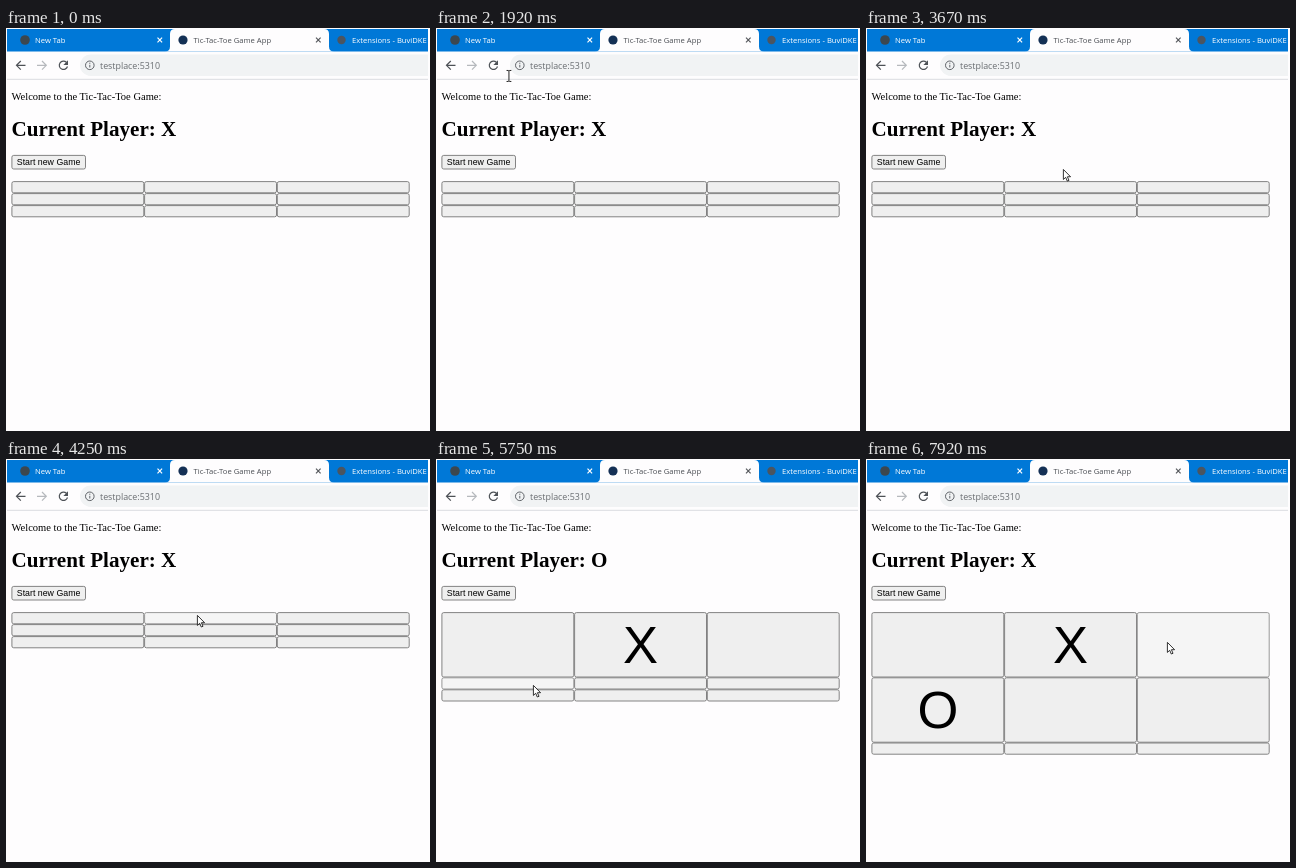
An HTML page for the animation above (8000 ms loop, 424 px wide and 403 px high).

```html
<!DOCTYPE html>
<html lang="en">
<head>
<meta charset="utf-8">
<title>Tic-Tac-Toe</title>
<style>
  html, body { margin: 0; width: 100%; height: 100%; overflow: hidden; background: #fefdfe; }
  svg { display: block; width: 100%; height: 100%; }
  .ui { font: 7.65px "Open Sans", sans-serif; }
  .serif { font: 10.5px "Liberation Serif", serif; }
  .title { font: bold 21.1px "Liberation Serif", serif; }
  .sans { font: 8.8px "Liberation Sans", sans-serif; }
  .mark { font: 52.5px "Liberation Sans", sans-serif; text-anchor: middle; }
  .line { fill: none; stroke-width: 1.2; }
</style>
</head>
<body>
<svg viewBox="0 0 424 403">
  <defs><clipPath id="window"><rect x="1" width="421" height="403"/></clipPath></defs>
  <rect width="424" height="403" fill="#fefdfe"/>

  <g clip-path="url(#window)">
    <rect y="1" width="424" height="22.5" fill="#0078d7"/>
    <path d="M159 23.5q5 0 5-5V6q0-5 5-5h149q5 0 5 5v12.5q0 5 5 5z" fill="#fefdfe"/>
    <circle cx="19" cy="12" r="4.8" fill="#3c474f"/>
    <circle cx="177" cy="12" r="4.6" fill="#143055"/>
    <circle cx="335.5" cy="12" r="4.2" fill="#4b5560"/>
    <g class="ui">
      <text x="29" y="15" fill="#fff">New Tab</text>
      <text x="187.5" y="15" fill="#4a4e53">Tic-Tac-Toe Game App</text>
      <text x="346" y="15" fill="#fff">Extensions - BuviDKE</text>
    </g>
    <path class="line" d="M151.5 9.7l4.6 4.6m0-4.6l-4.6 4.6" stroke="#fff"/>
    <path class="line" d="M310 9.7l4.6 4.6m0-4.6l-4.6 4.6" stroke="#55585c"/>

    <rect x="74" y="26.5" width="370" height="21.5" rx="10.7" fill="#f1f3f4"/>
    <path d="M0 51.3H424" stroke="#dadce0"/>
    <path class="line" d="M19.5 37.3H10.6M14.8 33l-4.3 4.3 4.3 4.3" stroke="#4d5156"/>
    <path class="line" d="M31 37.3h9.2M36 33l4.3 4.3-4.3 4.3" stroke="#b6b9bd"/>
    <circle id="glow" cx="57.4" cy="37.4" r="10.4" fill="#e8eaed"/>
    <path class="line" d="M60.4 34.2a4.2 4.2 0 1 0 1.1 4.3" stroke="#4d5156"/>
    <path d="M62 32.3v4.6h-4.6z" fill="#4d5156"/>
    <circle cx="83.8" cy="37.3" r="4.3" fill="none" stroke="#5f6368"/>
    <path d="M83.8 36.8v2.7M83.8 34.7v1.1" stroke="#5f6368"/>
    <text class="ui" x="94" y="40.5" fill="#686c70" style="font-size:8.9px">testplace:5310</text>
  </g>

  <text class="serif" x="5.5" y="72">Welcome to the Tic-Tac-Toe Game:</text>
  <text id="player" class="title" x="5.5" y="107.5"></text>
  <rect x="5.9" y="127.4" width="73.6" height="13.6" rx="1.8" fill="#efefef" stroke="#767676" stroke-width=".9"/>
  <text class="sans" x="10.8" y="137.4">Start new Game</text>

  <g id="board"></g>
  <g id="cursor">
    <path id="arrow" d="M.4.4V10.4L2.7 8.3 4.3 12l1.7-.7L4.4 7.7H7.6z" fill="#fff" stroke="#111" stroke-width=".85"/>
    <path id="beam" class="line" d="M-2.4-5.5H-.6L0-5 .6-5.5H2.4M0-5V5M-2.4 5.5H-.6L0 5 .6 5.5H2.4" stroke="#222" style="stroke-width:1"/>
  </g>
</svg>

<script>
const LOOP = 8000, STEP = 1000 / 12;
const LEFT = 5.5, TOP = 153.2, COL = 132.7, LOW = 12, HIGH = 65.2;
const PLAY_X = 4300, PLAY_O = 5800;
const FILL = { idle: '#efefef', hover: '#e5e5e5', active: '#f5f5f5' };
const EDGE = { idle: '#767676', hover: '#4f4f4f', active: '#8d8d8d' };

// Pointer track: time, x, y
const track = [
  [400, 228, 195], [750, 150, 150], [1166, 67, 92],
  [1833, 67, 92], [1916, 73, 48], [2083, 60, 39], [2333, 57, 36],
  [2583, 57, 36], [2916, 130, 52], [3250, 207, 85],
  [3416, 207, 85], [3666, 197, 141], [3833, 191, 156],
  [4500, 191, 156], [4666, 151, 184], [4916, 119, 209], [5333, 97, 226],
  [7166, 97, 226], [7250, 121, 213], [7500, 220, 194], [7750, 301, 183]
];

// Button states: start time, cell index, state
const states = [
  [0, -1, 'idle'], [3990, 1, 'hover'], [4240, 1, 'active'], [4320, 1, 'hover'],
  [4740, 0, 'hover'], [5160, 3, 'hover'], [5740, 3, 'active'], [5820, 3, 'hover'],
  [7320, 1, 'hover'], [7650, 2, 'hover'], [7910, 2, 'active']
];

const get = id => document.getElementById(id);
const show = (el, on) => el.setAttribute('visibility', on ? 'visible' : 'hidden');

function make(tag, attrs) {
  const el = document.createElementNS('http://www.w3.org/2000/svg', tag);
  set(el, attrs);
  return get('board').appendChild(el);
}

function set(el, attrs) {
  for (const key in attrs) el.setAttribute(key, attrs[key]);
}

const cells = Array.from({ length: 9 }, () => make('rect', { rx: 1.8, 'stroke-width': .9 }));
const markX = make('text', { class: 'mark', x: LEFT + COL * 1.5, y: TOP + 50.8 });
const markO = make('text', { class: 'mark', x: LEFT + COL * .5, y: TOP + HIGH + 50.8 });
markX.textContent = 'X';
markO.textContent = 'O';

function pointerAt(t) {
  const i = track.findIndex(key => key[0] > t);
  if (i < 0) return track[track.length - 1].slice(1);
  const b = track[i], a = track[i - 1] || b;
  const k = a === b ? 0 : (t - a[0]) / (b[0] - a[0]);
  return [a[1] + (b[1] - a[1]) * k, a[2] + (b[2] - a[2]) * k];
}

function drawBoard(t) {
  const [, target, state] = states.filter(s => s[0] <= t).pop();
  const heights = [t >= PLAY_X ? HIGH : LOW, t >= PLAY_O ? HIGH : LOW, LOW];
  let y = TOP;
  cells.forEach((cell, i) => {
    const row = Math.floor(i / 3), look = i === target ? state : 'idle';
    set(cell, {
      x: LEFT + (i % 3) * COL + .4, y: y + .4,
      width: COL - .8, height: heights[row] - .8,
      fill: FILL[look], stroke: EDGE[look]
    });
    if (i % 3 === 2) y += heights[row];
  });
  show(markX, t >= PLAY_X);
  show(markO, t >= PLAY_O);
}

function draw(time) {
  const t = Math.floor((time % LOOP) / STEP + .001) * STEP;
  const [x, y] = pointerAt(t);
  const visible = t > 400, typing = t > 1040 && t < 1990;
  get('player').textContent = 'Current Player: ' + (t >= PLAY_X && t < PLAY_O ? 'O' : 'X');
  show(get('glow'), t > 2070 && t < 2740);
  show(get('arrow'), visible && !typing);
  show(get('beam'), visible && typing);
  set(get('cursor'), { transform: `translate(${x} ${y})` });
  drawBoard(t);
}

const start = performance.now();
function tick() {
  draw(performance.now() - start);
  requestAnimationFrame(tick);
}
tick();
</script>
</body>
</html>
```
